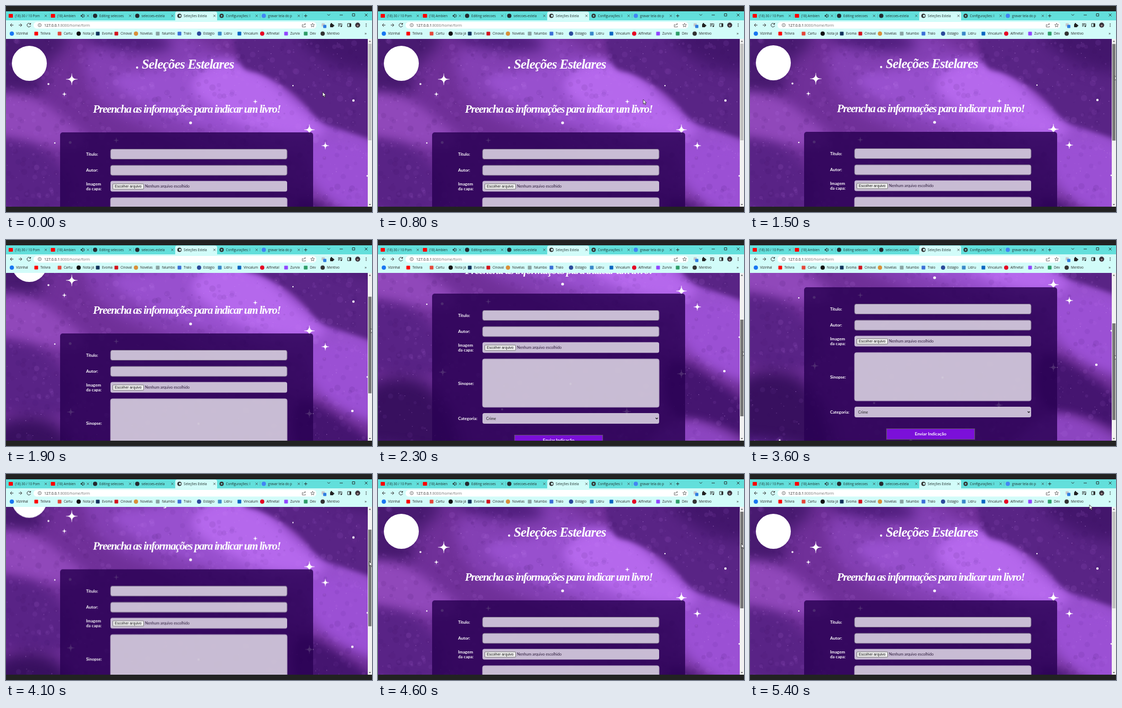
An HTML page with a canvas for the animation above (5600 ms loop, 690 by 388 pixels).

```html
<!DOCTYPE html>
<html lang="pt">
<head>
<meta charset="utf-8">
<style>
  html, body { margin: 0; width: 100%; height: 100%; overflow: hidden; background: #1d1d1d; }
  canvas { display: block; }
</style>
</head>
<body>
<canvas id="stage" width="690" height="388"></canvas>
<script>
const LOOP = 5600, STEP = 100;
const VIEW = { top: 62, bottom: 378, width: 682, height: 520 };
const UI = '"Open Sans", sans-serif', LABEL = 'Lato, sans-serif', SCRIPT = '"Liberation Serif", serif';
const stage = document.getElementById('stage').getContext('2d');

// [time, scroll]
const scrollKeys = [[1400, 0], [1500, 1], [1600, 9], [1900, 62], [2300, 137], [2600, 192], [2700, 203],
  [3250, 203], [3600, 149], [4100, 58.5], [4400, 8], [4500, 0]];
// [time, x, y]; y is taken from the thumb while dragging
const pointerKeys = [[0, 597, 162], [300, 520, 186], [600, 446, 200], [800, 500, 176], [1000, 610, 128],
  [1150, 682, 112], [1300, 688, 131], [3600, 688, 131], [4100, 685, 131], [4600, 685, 131],
  [4900, 672, 104], [5200, 648, 68], [5400, 640, 58]];
const DRAG = [1300, 4600];

function sample(keys, t, i = 1) {
  const n = keys.findIndex(k => k[0] > t);
  if (n === 0) return keys[0][i];
  if (n < 0) return keys.at(-1)[i];
  const a = keys[n - 1], b = keys[n];
  return a[i] + (b[i] - a[i]) * (t - a[0]) / (b[0] - a[0]);
}

let seed = 11;
const random = () => (seed = seed * 16807 % 2147483647) / 2147483647;

function layer(width, height, top, paint) {
  const canvas = document.createElement('canvas');
  canvas.width = width;
  canvas.height = height;
  const c = canvas.getContext('2d');
  c.translate(0, -top);
  paint(c);
  return canvas;
}

function text(c, str, x, y, font, color, spacing = 0, align = 'left') {
  c.font = font;
  c.fillStyle = color;
  c.letterSpacing = spacing + 'px';
  c.textAlign = align;
  c.fillText(str, x, y);
}

function rect(c, x, y, w, h, color, radius = 0, border) {
  c.beginPath();
  c.roundRect(x, y, w, h, radius);
  c.fillStyle = color;
  c.fill();
  if (border) { c.strokeStyle = border; c.stroke(); }
}

function dot(c, x, y, r, color) {
  c.beginPath();
  c.arc(x, y, r, 0, 7);
  c.fillStyle = color;
  c.fill();
}

function lines(c, d, color = '#222', width = 1) {
  c.strokeStyle = color;
  c.lineWidth = width;
  c.stroke(new Path2D(d));
}

function cloud(c, color, blur, ...p) {
  const n = p.length / 2, at = i => [p[i % n * 2], p[i % n * 2 + 1]];
  const mid = i => { const [a, b] = at(i), [x, y] = at(i + 1); return [(a + x) / 2, (b + y) / 2]; };
  c.filter = `blur(${blur}px)`;
  c.beginPath();
  c.moveTo(...mid(0));
  for (let i = 1; i <= n; i++) c.quadraticCurveTo(...at(i), ...mid(i));
  c.fillStyle = color;
  c.fill();
  c.filter = 'none';
}

function sparkle(c, x, y, r) {
  c.beginPath();
  c.moveTo(x, y - r);
  for (const [dx, dy] of [[1, 0], [0, 1], [-1, 0], [0, -1]])
    c.quadraticCurveTo(x, y, x + dx * r, y + dy * r);
  c.fillStyle = '#fff';
  c.fill();
  lines(c, `M${x - r} ${y}h${2 * r}M${x} ${y - r}v${2 * r}`, 'rgba(255,255,255,.75)', 0.8);
}

function paintSky(c) {
  rect(c, 0, 62, 682, 520, '#703099');
  cloud(c, '#481a70', 14, -60, 20, 130, 40, 110, 85, 60, 120, 80, 165, -60, 190);
  cloud(c, '#8440b4', 12, 130, 70, 320, 40, 420, 100, 500, 130, 570, 200, 730, 250, 730, 390, 480, 330, 300, 240, 170, 190);
  cloud(c, '#4f1d7c', 12, 120, 40, 260, 40, 330, 75, 270, 90, 180, 80);
  cloud(c, '#9850ce', 9, 180, 130, 300, 120, 400, 90, 490, 125, 570, 200, 700, 250, 720, 330, 580, 290, 400, 240, 260, 190);
  cloud(c, '#b568ec', 10, 330, 150, 410, 95, 490, 130, 560, 200, 620, 245, 520, 250, 420, 215);
  cloud(c, '#592485', 4, 420, 30, 730, 30, 730, 265, 640, 235, 590, 220, 550, 165, 480, 125, 440, 120);
  cloud(c, '#43166c', 14, 520, 40, 730, 20, 730, 130, 620, 120);
  cloud(c, '#9048ba', 10, -50, 160, 50, 165, 120, 220, 170, 260, 90, 270, -50, 240);
  cloud(c, '#592386', 10, -50, 250, 60, 255, 130, 330, 120, 400, -50, 380);
  cloud(c, '#9b50d4', 10, 560, 250, 730, 265, 730, 420, 640, 390, 570, 330);
  cloud(c, '#451570', 8, 540, 350, 620, 390, 730, 470, 730, 530, 640, 480, 540, 470);
  cloud(c, '#8c45c0', 9, 560, 470, 640, 490, 730, 550, 730, 620, 400, 620, 480, 545);
  cloud(c, '#38105f', 14, -50, 400, 120, 390, 180, 620, -50, 620);
  cloud(c, '#63299a', 12, -50, 520, 60, 530, 150, 555, 400, 545, 420, 620, -50, 620);

  // brush grain and light specks
  for (let i = 0; i < 1500; i++) {
    const x = random() * 682, y = 62 + random() * 520;
    c.globalAlpha = 0.03 + random() * 0.07;
    dot(c, x, y, 1 + random() * 5, random() < 0.5 ? '#d28aff' : '#35085e');
  }
  for (let i = 0; i < 620; i++) {
    c.globalAlpha = 0.15 + random() * 0.4;
    dot(c, random() * 682, 62 + random() * 520, 0.3 + random() * 0.5, '#e3b1ff');
  }
  c.globalAlpha = 1;
  for (const s of [[124, 138, 11], [110, 166, 4], [470, 180, 4], [572, 233, 10], [602, 263, 7],
    [208, 253, 5], [122, 386, 7], [572, 389, 8], [469, 460, 8]]) sparkle(c, ...s);
  for (const [x, y, r] of [[80, 147, 1.8], [541, 150, 1.2], [655, 178, 2.2], [348, 220, 2.6], [92, 258, 1.3],
    [121, 257, 2.6], [681, 320, 1.4], [653, 384, 2.3], [56, 526, 1.6], [554, 556, 1.5],
    [234, 456, 2], [303, 528, 3], [363, 408, 2.2]]) dot(c, x, y, r, '#fff');
}

function paintPage(c) {
  paintSky(c);
  dot(c, 44, 108, 33, '#fff');
  text(c, '. Seleções Estelares', 245, 118, `italic bold 25px ${SCRIPT}`, '#fff', -0.8);
  text(c, 'Preencha as informações para indicar um livro!', 164, 201, `italic bold 21px ${SCRIPT}`, '#fff', -1.4);

  rect(c, 102, 238, 477, 313, 'rgba(41,0,83,.83)', 5);
  c.lineWidth = 1;
  for (const [y, h, border] of [[269.5, 19, '#6b5a7c'], [300, 19, '#6b5a7c'], [329.5, 20], [361, 91, '#a794b8'], [463, 20]])
    rect(c, 197, y, 333, h, 'rgba(255,255,255,.73)', 3.5, border);
  for (const [label, y] of [['Título:', 281.5], ['Autor:', 312], ['Imagem', 338], ['da capa:', 346.5],
    ['Sinopse:', 409.5], ['Categoria:', 476]]) text(c, label, 151, y, `bold 8px ${LABEL}`, '#fff');

  rect(c, 201.5, 335, 58, 10, '#efefef', 1, '#767676');
  text(c, 'Escolher arquivo', 205, 342.3, '6.8px "Liberation Sans", sans-serif', '#111');
  text(c, 'Nenhum arquivo escolhido', 262, 342.3, `7.2px ${LABEL}`, '#2b1a3a');
  text(c, 'Crime', 204, 475.5, `7px ${LABEL}`, '#222');
  lines(c, 'M523.5 472l2 2l2-2', '#111', 1.2);
  rect(c, 257.5, 504.5, 166, 20, '#7b10d9', 0, '#66556f');
  text(c, 'Enviar Indicação', 340.5, 517.3, `bold 8.2px ${LABEL}`, '#fff', 0, 'center');
}

function paintBrowser(c) {
  rect(c, 0, 0, 690, 10, '#222');
  rect(c, 0, 378, 690, 10, '#222');
  rect(c, 0, 10, 690, 17, '#62dfdb');
  rect(c, 0, 27, 690, 35, '#d2fcf9');
  rect(c, 319, 10.5, 79, 18, '#d2fcf9', [4, 4, 0, 0]);

  const tabs = [['(18) 30 / 10 Pom', '#f00', 1], ['(18) Ambien', '#f00', 1], ['Editing selecoes', '#24292f'],
    ['selecoes-estela', '#24292f'], ['Seleções Estela', '#333'], ['Configurações: I', '#333'], ['gravar tela do p', '#4285f4']];
  tabs.forEach(([title, color, square], i) => {
    const x = 9 + i * 79.5;
    if (square) rect(c, x - 4, 15, 8, 7, color, 1);
    else dot(c, x, 18.5, 4, color);
    c.save();
    c.beginPath();
    c.rect(x + 7, 12, 53, 14);
    c.clip();
    text(c, title, x + 8, 20.5, `6.2px ${UI}`, '#20302f');
    c.restore();
    lines(c, `M${x + 64} 16.5l4 4m0-4l-4 4`, '#333', 0.8);
    if (i < 3 || i > 4) lines(c, `M${x + 72.5} 14.5v8`, '#4ea9a6', 0.6);
  });
  dot(c, 328, 18.5, 2, '#d2fcf9');
  dot(c, 406.5, 18.5, 1.5, '#62dfdb');
  rect(c, 141, 17, 2, 3, '#222');
  lines(c, 'M143 17l2-2v7l-2-2M147 16q2 2.5 0 5', '#222', 0.9);
  lines(c, 'M562 18.5h6m-3-3v6M606 15.5l2.5 2.5l2.5-2.5M629 17h6M653 14.5h4.5v4.5h-4.5zM676.5 14.5l5 5m0-5l-5 5', '#222', 0.9);

  rect(c, 52, 30, 533, 12.5, '#fff', 6);
  lines(c, 'M14 36h-6m3-3l-3 3l3 3M24 36h6m-3-3l3 3l-3 3', '#333');
  lines(c, 'M46 34a3.5 3.5 0 1 0 .5 3M46.5 32v2.5h-2.5', '#333');
  lines(c, 'M60.5 36a3 3 0 1 0 6 0a3 3 0 1 0-6 0M63.5 35.5v2M63.5 34v.7', '#555', 0.8);
  text(c, '127.0.0.1', 72, 38.5, `6.9px ${UI}`, '#222');
  text(c, ':8000/home/form', 72 + c.measureText('127.0.0.1').width, 38.5, `6.9px ${UI}`, '#777');
  lines(c, 'M560 35h-1.5v4.5h6v-1.5M560.5 37q.5-3 4-3m-1.5-1.5l1.8 1.5l-1.8 1.5', '#555', 0.8);
  lines(c, 'M578 32.5l1 2.4l2.6.2l-2 1.7l.7 2.6l-2.3-1.4l-2.3 1.4l.7-2.6l-2-1.7l2.6-.2z', '#555', 0.8);
  rect(c, 595, 32.5, 6, 6, '#c4c9cd', 1);
  rect(c, 598, 35.5, 6, 6, '#2f7de0', 1);
  rect(c, 611, 34, 6, 6, '#222', 1);
  dot(c, 613.5, 33.5, 1.4, '#222');
  dot(c, 617.5, 37, 1.4, '#222');
  lines(c, 'M626 33.5h6m-6 2.2h5m-5 2.2h3M633 33v5', '#222');
  dot(c, 632, 38.3, 1.3, '#222');
  rect(c, 644, 33, 6, 6, '#d2fcf9', 0, '#222');
  rect(c, 647.5, 33, 3, 6, '#222');
  dot(c, 663, 36, 4.7, '#39313a');
  dot(c, 663, 37, 1.8, '#a08b88');
  for (const y of [33.5, 36, 38.5]) dot(c, 679, y, 0.8, '#222');

  const bookmarks = [['Vizinhal', 11, '#1877f2'], ['Telivra', 57, '#f00'], ['Cartu', 101, '#e5473a'], ['Nota já', 137, '#111'],
    ['Evoma', 173, '#12335c'], ['Cinoval', 208, '#d3121c'], ['Novelas', 245, '#d9903a'], ['falumbo', 286, '#89a3a2'],
    ['Tralo', 327, '#3b6fd8'], ['Estágio', 364, '#2b4a9b'], ['Lidru', 403, '#3b89c9'], ['Vincalum', 440, '#0a66c2'],
    ['Alfinetal', 483, '#e60023'], ['Zurvix', 528, '#9146ff'], ['Dev', 565, '#2f9d68'], ['Mentivo', 597, '#333']];
  bookmarks.forEach(([name, x, color], i) => {
    if (i % 3) rect(c, x - 3.5, 48.5, 7, 7, color, 1);
    else dot(c, x, 52, 4, color);
    text(c, name, x + 8, 54.3, `6.3px ${UI}`, '#222');
  });
  text(c, '»', 676, 54.3, `8px ${UI}`, '#222');
}

function drawScrollbar(scroll, dragging) {
  rect(stage, 682, 62, 8, 316, '#f1f1f1');
  rect(stage, 683, 71 + scroll * 0.577, 6, 182, dragging ? '#787878' : '#c1c1c1');
  stage.fillStyle = '#555';
  stage.fill(new Path2D('M684 67.5h4l-2-2.5zM684 373h4l-2 2.5z'));
}

function drawPointer(x, y) {
  const arrow = new Path2D(`M${x} ${y}v8.5l2-1.8l1.5 3.3l1.4-.7l-1.5-3.1h2.6z`);
  stage.fillStyle = '#fff';
  stage.fill(arrow);
  stage.strokeStyle = '#111';
  stage.lineWidth = 0.7;
  stage.stroke(arrow);
}

const page = layer(VIEW.width, VIEW.height, VIEW.top, paintPage);
const browser = layer(690, 388, 0, paintBrowser);

function draw(now) {
  const t = Math.floor(now % LOOP / STEP) * STEP;
  const scroll = sample(scrollKeys, t);
  const dragging = t >= DRAG[0] && t <= DRAG[1];
  stage.clearRect(0, 0, 690, 388);
  stage.drawImage(page, 0, VIEW.top - scroll);
  stage.drawImage(browser, 0, 0);
  // cover what the page leaves above its viewport
  stage.save();
  stage.beginPath();
  stage.rect(0, 0, 690, VIEW.top);
  stage.clip();
  stage.drawImage(browser, 0, 0);
  stage.restore();
  drawScrollbar(scroll, dragging);
  drawPointer(sample(pointerKeys, t), dragging ? 131 + scroll * 0.577 : sample(pointerKeys, t, 2));
  requestAnimationFrame(draw);
}
requestAnimationFrame(draw);
</script>
</body>
</html>
```
